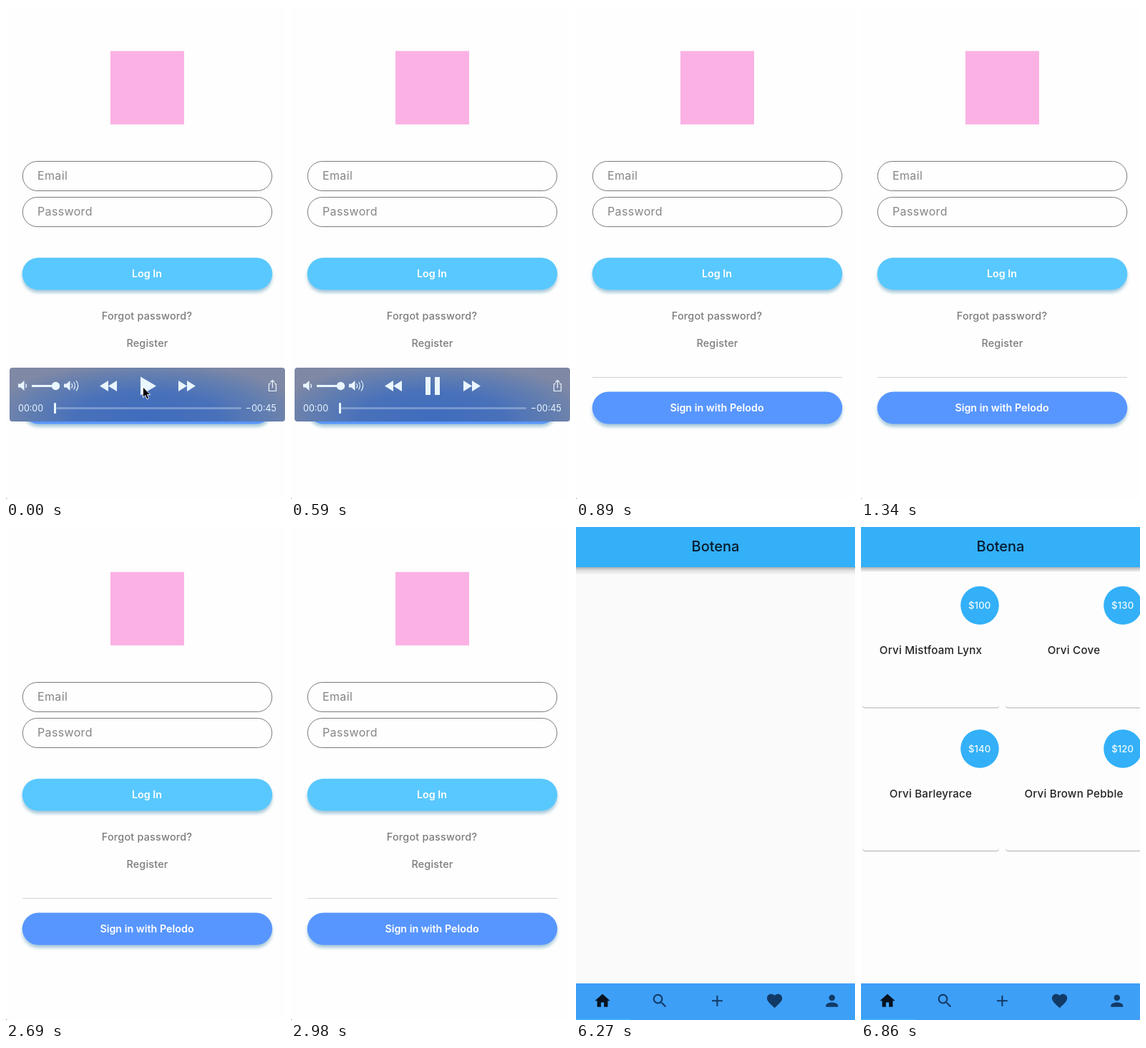
An HTML page that plays this animation: 390 px wide and 687 px high, repeating every 8000 ms.

```html
<!DOCTYPE html>
<html lang="en">
<head>
<meta charset="utf-8">
<title>Shop login</title>
<style>
  html, body { margin: 0; width: 100%; height: 100%; overflow: hidden; background: #fefefe; }
  svg { display: block; width: 390px; height: 687px; font-family: Inter, Roboto, sans-serif; }
  .mid { text-anchor: middle; }
  .field rect { fill: #fefefe; stroke: #7b7b7b; }
  .field text { font-size: 16px; fill: #858585; letter-spacing: .35px; }
  .link { font-size: 14.4px; fill: #7c7c7c; font-weight: 450; letter-spacing: .2px; }
  .button { filter: drop-shadow(0 4px 2.2px rgba(50, 130, 170, .42)); }
  .label { font-size: 14.3px; font-weight: 600; fill: #fff; }
  .time { font-size: 12.5px; font-weight: 400; }
  .title { font-size: 20px; font-weight: 450; fill: #071a2e; }
  .card { fill: #fdfdfd; filter: drop-shadow(0 1px .7px rgba(0, 0, 0, .3)); }
  .name { font-size: 15.2px; font-weight: 450; fill: #222; letter-spacing: .2px; }
  .price { font-size: 13.2px; font-weight: 450; fill: #f2faff; letter-spacing: .1px; }
</style>
</head>
<body>
<svg viewBox="0 0 390 687">
  <defs>
    <radialGradient id="glass" gradientUnits="userSpaceOnUse" r="1" cx="0" cy="0"
      gradientTransform="translate(197 573) scale(225 78)">
      <stop offset="0" stop-color="#3f6cbd"/>
      <stop offset=".45" stop-color="#4971ba"/>
      <stop offset=".75" stop-color="#627eb0"/>
      <stop offset="1" stop-color="#7f88a5"/>
    </radialGradient>
    <linearGradient id="shade" x2="0" y2="1">
      <stop offset="0" stop-opacity=".3"/>
      <stop offset=".4" stop-opacity=".11"/>
      <stop offset="1" stop-opacity="0"/>
    </linearGradient>
  </defs>

  <g id="login">
    <rect width="390" height="687" fill="#fefefe"/>
    <rect x="146" y="62.7" width="103" height="102.3" fill="#fbb1e4"/>
    <g class="field">
      <rect x="23.3" y="216.5" width="348.5" height="41" rx="20.5"/>
      <text x="44" y="242">Email</text>
      <rect x="23.3" y="266.5" width="348.5" height="41" rx="20.5"/>
      <text x="44" y="292">Password</text>
    </g>
    <rect class="button" x="22.7" y="350.7" width="349.6" height="44.8" rx="22.4" fill="#59c8ff"/>
    <text class="label mid" x="197" y="378">Log In</text>
    <text class="link mid" x="197" y="437">Forgot password?</text>
    <text class="link mid" x="197.5" y="475">Register</text>
    <path d="M23 517.5H372" stroke="#d2d2d2"/>
    <rect class="button" x="22.7" y="537.6" width="349.6" height="44.8" rx="22.4" fill="#5896ff"/>
    <text class="label mid" x="197" y="565">Sign in with Pelodo</text>
    <rect y="686" width="1" height="1" fill="#777"/>

    <g id="player" fill="#eaf6ff">
      <rect x="5" y="504" width="385" height="75" rx="4" fill="url(#glass)"/>
      <path id="speaker" d="M17 526.5h3.5l5-4.5v14l-5-4.5H17z"/>
      <use href="#speaker" x="64"/>
      <g fill="none" stroke="#eaf6ff" stroke-width="1.2">
        <path d="M27.5 526.5q2 2.7 0 5.5M91.5 526q2.5 3.2 0 6.5M94.5 524q4 5 0 10.5M98 522q5.5 7 0 14.5"/>
        <path d="M370 526.5h-2.5v10h10v-10H375M372.5 532v-10M369.5 524.5l3-3 3 3"/>
      </g>
      <path d="M36 528h34v3H36z"/>
      <circle cx="69.5" cy="529.5" r="5.7"/>
      <path d="M143 522v15l-12-7.5zM155 522v15l-12-7.5zM241 522v15l12-7.5zM253 522v15l12-7.5z"/>
      <path id="play" d="M188 516.5v26l22-13z"/>
      <path id="pause" d="M188 517h7v25h-7zM201 517h7v25h-7z"/>
      <text class="time" x="17" y="565">00:00</text>
      <text class="time" x="378" y="565" text-anchor="end">−00:45</text>
      <rect x="70" y="559" width="259" height="3" rx="1.5" opacity=".3"/>
      <rect x="67" y="553" width="3" height="15" rx="1"/>
    </g>
    <path id="cursor" d="M191.5 531v14.5l3.3-3 2.2 5.2 2.6-1.1-2.2-5.1h4.4z"
      stroke="#fff" stroke-width=".9"/>
  </g>

  <g id="shop">
    <rect id="page" width="390" height="687"/>
    <rect y="56" width="390" height="11" fill="url(#shade)"/>
    <g id="cards"><rect y="62" width="390" height="574" fill="#fdfdfd"/></g>
    <rect width="390" height="56" fill="#33b0f8"/>
    <text class="title mid" x="195" y="34">Botena</text>
    <rect y="636" width="390" height="51" fill="#3e9ff7"/>
    <rect y="685.5" width="76" height="1.5" fill="#3fb8fa"/>
    <g id="nav"></g>
  </g>
</svg>
<script>
const $ = id => document.getElementById(id);
const show = (id, on) => $(id).style.display = on ? "" : "none";

const products = [
  ["Orvi Mistfoam Lynx", 100], ["Orvi Cove", 130],
  ["Orvi Barleyrace", 140], ["Orvi Brown Pebble", 120]
];
// Only the lower edge of each card stands out, so its top is clipped.
$("cards").innerHTML += products.map(([name, price], i) =>
  `<g transform="translate(${i % 2 * 200} ${(i >> 1) * 199.7})">
    <rect class="card" x="2" y="66" width="191" height="185.4" rx="4"
      style="clip-path: inset(20px -2px -4px -2px)"/>
    <circle cx="166" cy="109.3" r="26.8" fill="#33b0f8"/>
    <text class="price mid" x="165.7" y="114">$${price}</text>
    <text class="name mid" x="97.5" y="177">${name}</text></g>`).join("");

const icons = [
  "M10 20v-6h4v6h5v-8h3L12 3 2 12h3v8z",
  "M15.5 14h-.79l-.28-.27A6.47 6.47 0 0 0 16 9.5 6.5 6.5 0 1 0 9.5 16c1.61 0 3.09-.59 4.23-1.57l.27.28v.79l5 4.99L20.49 19zm-6 0a4.5 4.5 0 1 1 0-9 4.5 4.5 0 0 1 0 9z",
  "M19 13h-6v6h-2v-6H5v-2h6V5h2v6h6z",
  "M12 21.35l-1.45-1.32C5.4 15.36 2 12.28 2 8.5 2 5.42 4.42 3 7.5 3c1.74 0 3.41.81 4.5 2.09C13.09 3.81 14.76 3 16.5 3 19.58 3 22 5.42 22 8.5c0 3.78-3.4 6.86-8.55 11.54z",
  "M12 12a4 4 0 1 0 0-8 4 4 0 0 0 0 8zm0 2c-2.67 0-8 1.34-8 4v2h16v-2c0-2.66-5.33-4-8-4z"
];
$("nav").innerHTML = icons.map((d, i) =>
  `<path d="${d}" fill="${i ? "#123a66" : "#06121f"}"
    transform="translate(${37 + i * 80.2} 660.3) scale(1.06) translate(-12 -12)"/>`).join("");

function draw(t) {
  const shop = t >= 6270, loaded = t >= 6860;
  show("login", !shop);
  show("shop", shop);
  show("cursor", t < 450);
  show("play", t < 450);
  show("pause", t >= 450);
  show("player", t < 890);
  $("player").style.opacity = t < 740 ? 1 : .25;
  show("cards", loaded);
  $("page").setAttribute("fill", loaded ? "#fdfdfd" : "#fafafa");
}

const start = performance.now();
function tick() {
  draw((performance.now() - start) % 8000);
  requestAnimationFrame(tick);
}
tick();
</script>
</body>
</html>
```
